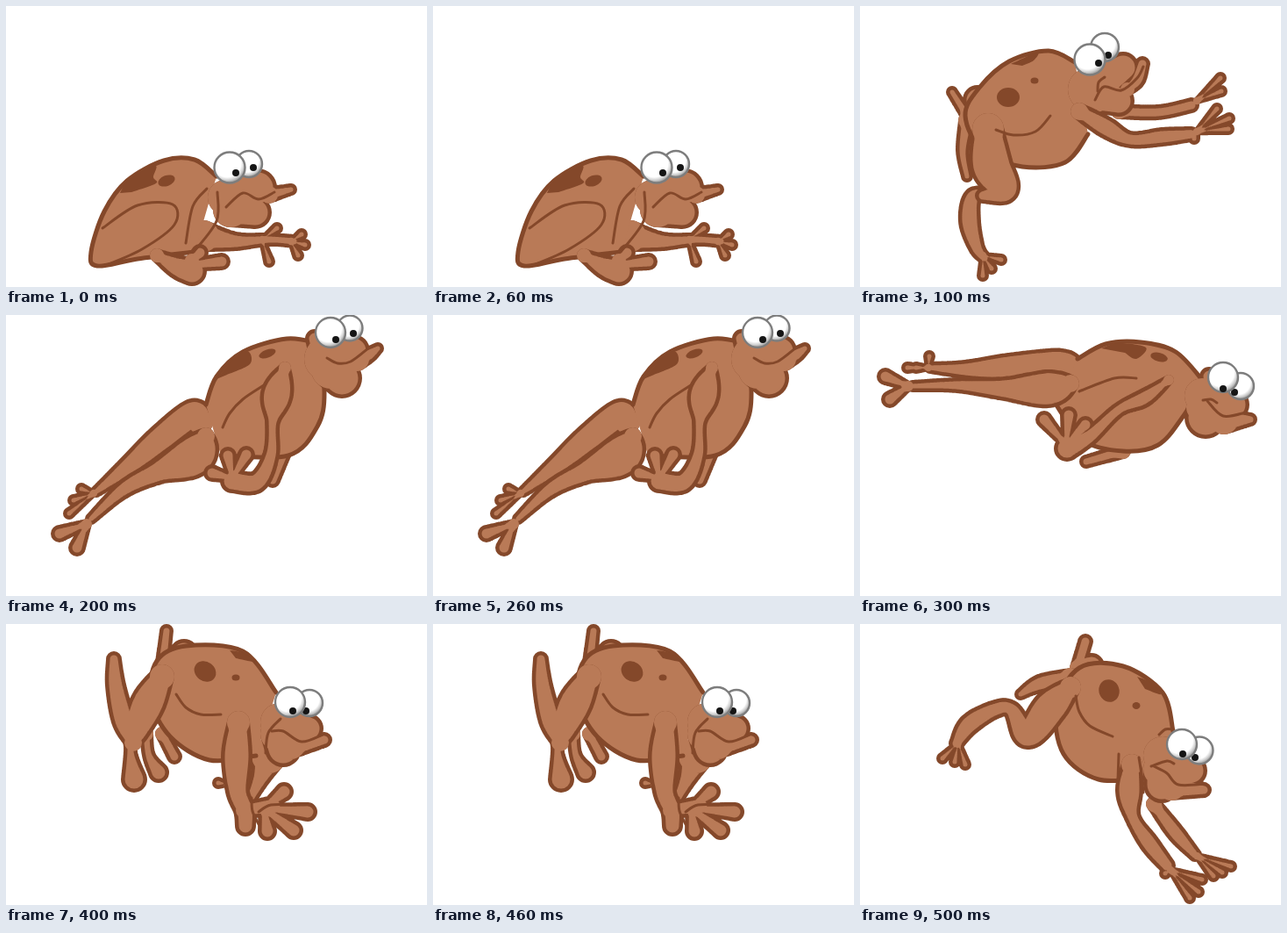
Recreate the animation shown at these times as an HTML page. Size 480x320 px, loop 0.6 s.

```html
<!DOCTYPE html>
<html lang="en">
<head>
<meta charset="utf-8">
<title>Leaping frog</title>
<style>
  html, body { margin: 0; width: 100%; height: 100%; overflow: hidden; background: #fff; }
  svg { display: block; width: 480px; height: 320px; }
  path { stroke-linecap: round; stroke-linejoin: round; }
</style>
</head>
<body>
<svg id="stage" viewBox="0 0 480 320">
  <defs>
    <radialGradient id="ball" cx=".42" cy=".36" r=".68">
      <stop offset=".66" stop-color="#fff"/>
      <stop offset=".8" stop-color="#d2d2d2"/>
      <stop offset="1" stop-color="#7c7c7c"/>
    </radialGradient>
  </defs>
</svg>
<script>
const SKIN = '#b97a57', DARK = '#84482a', STEP = 100, EDGE = 4.5;
const stage = document.getElementById('stage');
const poses = [];
let group;

function add(tag, attrs, parent = group) {
  const el = document.createElementNS('http://www.w3.org/2000/svg', tag);
  for (const key in attrs) el.setAttribute(key, attrs[key]);
  return parent.appendChild(el);
}

const points = text => text.trim().split(/\s+/).map(p => p.split(',').map(Number));

// Catmull-Rom spans as Bezier control points, for any number of dimensions.
const spans = pts => pts.slice(1).map((c, i) => {
  const b = pts[i], a = pts[i - 1] || b, e = pts[i + 2] || c;
  return [b, b.map((v, k) => v + (c[k] - a[k]) / 6), c.map((v, k) => v - (e[k] - b[k]) / 6), c];
});

// "|" makes the point before it a corner.
function curve(text) {
  let d = '', last = [];
  for (const part of text.split('|')) {
    const pts = [...last, ...points(part)];
    if (!d) d = 'M' + pts[0];
    for (const [, p, q, r] of spans(pts)) d += `C${p} ${q} ${r}`;
    last = [pts[pts.length - 1]];
  }
  return d;
}

const bezier = (s, t) => s[0].map((v, k) =>
  v * (1 - t) ** 3 + 3 * s[1][k] * t * (1 - t) ** 2 + 3 * s[2][k] * t * t * (1 - t) + s[3][k] * t ** 3);

// A spine of "x,y,radius" swept by a disc.
function sweep(spine) {
  return spans(points(spine)).flatMap((s, i) => {
    const n = Math.ceil(Math.hypot(s[3][0] - s[0][0], s[3][1] - s[0][1]) / 1.5) + 2;
    return Array.from({ length: n + 1 }, (_, j) => [...bezier(s, j / n), i + j / n]);
  });
}

const disc = (x, y, r) => `M${x - r} ${y}a${r} ${r} 0 1 0 ${2 * r} 0a${r} ${r} 0 1 0 ${-2 * r} 0`;

// Tubes share one outline, which swells from nothing where each tube starts.
function tubes(...spines) {
  const discs = spines.flat().flatMap(sweep);
  add('path', { d: discs.map(([x, y, r]) => disc(x, y, r)).join(''), fill: DARK });
  add('path', {
    d: discs.map(([x, y, r, t]) => disc(x, y, Math.max(0.5, r - EDGE * Math.min(1, 3 * t)))).join(''),
    fill: SKIN
  });
}

const digits = (root, tips, r = 7) => tips.split(' ').map(tip => `${root},${r * 0.6} ${tip},${r}`);

const body = pts => add('path', { d: curve(pts), fill: SKIN, stroke: DARK, 'stroke-width': 5 });
const line = pts => add('path', { d: curve(pts), fill: 'none', stroke: DARK, 'stroke-width': 3 });
const patch = pts => add('path', { d: curve(pts), fill: DARK });
const spot = (cx, cy, rx, ry, turn = 0) =>
  add('ellipse', { cx, cy, rx, ry, fill: DARK, transform: `rotate(${turn} ${cx} ${cy})` });

function eye(cx, cy, r, px, py) {
  add('circle', { cx, cy, r, fill: 'url(#ball)', stroke: '#7d7d7d', 'stroke-width': 2.4 });
  add('circle', { cx: px, cy: py, r: 4, fill: '#151515' });
}

function pose(draw) {
  group = add('g', { opacity: 0 }, stage);
  poses.push(group);
  draw();
}

// Crouch
pose(() => {
  tubes('225,262,18 262,268,11 300,266,8 328,268,8', digits('325,268', '337,260 341,272 333,284'),
    digits('292,266', '309,253 300,291'));
  body('240,194 215,175 180,176 138,199 112,234 97,280 104,296 150,288 215,280');
  tubes('172,284,8 195,297,14 212,302,17', '210,295,8 246,291,10', '212,290,8 221,281,10');
  tubes('250,218,20 287,207,22', '256,232,20 284,235,19', '300,215,10 325,209,7');
  line('110,253 150,227 190,226 192,249 155,277 112,296');
  line('205,270 213,228 229,208');
  line('241,212 240,245 214,280');
  line('251,229 270,213 288,220 306,212');
  patch('130,213 140,198 170,182 168,195 171,202 143,212');
  spot(183, 199, 10, 6, -20);
  eye(277, 180, 15, 282, 184);
  eye(255, 184, 17.5, 262, 190);
});

// Take-off
pose(() => {
  tubes('122,125,8 105,98,7', '122,130,10 117,165,8 122,194,7', '140,115,15 134,107,17');
  tubes('295,120,9 340,121,9 378,113,9', digits('384,108', '411,82 412,97'));
  body('245,64 215,51 170,63 136,93 120,125 140,165 185,183 234,178 260,146');
  tubes('150,216,8 129,217,11 125,245,13 133,275,10 142,287,8', digits('140,284', '140,307 150,299 161,289'));
  tubes('146,140,18 150,182,25 165,209,17 140,216,9');
  tubes('262,95,25 300,70,18', '265,98,24 295,108,18', '305,95,8 316,84,10 322,66,9');
  tubes('250,120,10 280,138,13 308,152,10 345,149,11 378,146,9',
    digits('384,143', '407,117 421,128 420,140 381,151'));
  line('268,107 278,92 298,96 316,82 323,69');
  line('271,97 272,87 279,81');
  line('155,141 175,147 200,143 217,125');
  patch('172,66 202,53 198,62 185,68');
  spot(169, 104, 13, 11);
  spot(199, 85, 4.5, 3.5);
  eye(279, 47, 16, 283, 56);
  eye(262, 61, 17.5, 272, 65);
});

// Stretch upward
pose(() => {
  tubes('222,122,14 213,113,18 175,142,17 140,172,13 103,201,7', digits('100,203', '86,198 77,211 72,226'));
  tubes('320,150,9 304,188,9');
  body('228,102 240,70 270,42 320,27 355,32 | 363,88 355,127 322,160 245,160');
  tubes('228,138,10 215,160,25 175,178,15 135,198,11 97,232,7', digits('92,238', '61,249 81,265', 10));
  tubes('318,60,7 309,90,19 304,122,9 302,160,10 286,190,13 258,189,14',
    digits('258,186', '235,180 253,160 274,159', 10));
  tubes('356,40,12 352,27,11', '365,50,25 396,41,19', '370,62,22 383,72,23', '400,50,14 414,45,10 424,38,7');
  line('247,128 255,112 270,96 294,80');
  line('366,49 378,55 393,53 413,38');
  patch('240,73 264,46 277,42 278,56 252,68');
  spot(298, 44, 10, 4.5, -20);
  eye(392, 15, 14.5, 396, 21);
  eye(370, 20, 17, 376, 28);
});

// Glide
pose(() => {
  tubes('240,66,14 230,60,22 170,60,17 120,62,11 80,60,7', digits('78,60', '79,47 64,60 54,60'));
  tubes('300,155,9 258,167,8');
  body('248,50 280,33 320,31 360,42 392,76 | 368,116 340,148 300,155 255,143 222,100');
  tubes('240,78,10 215,84,22 165,84,14 110,80,9 60,81,7', digits('55,81', '29,70 34,96', 10));
  tubes('352,74,6 325,94,11 295,108,9 262,138,11 236,152,15', digits('235,148', '210,119 238,114 257,125', 10));
  tubes('398,85,10 398,70,11', '390,92,20 425,102,19', '388,105,16 394,117,24', '415,120,16 445,119,8');
  line('250,87 290,72 315,72');
  line('391,97 400,96 407,100');
  line('396,98 414,115 440,111');
  patch('275,38 295,32 326,37 315,50 302,43');
  spot(341, 48, 10, 5, 15);
  eye(434, 81, 15, 427, 88);
  eye(414, 71, 17, 414, 84);
});

// Descent
pose(() => {
  tubes('178,50,9 183,8,8', '203,38,15 203,34,17');
  tubes('160,125,8 163,150,8 174,169,12', '178,125,8 192,151,9');
  tubes('252,182,4 242,181,7');
  tubes('300,150,20 290,175,12 278,200,8');
  body('308,78 270,31 205,25 172,42 165,85 187,128 232,155 285,150');
  tubes('178,60,14 162,90,21 148,122,16 142,143,8 146,177,15', '145,135,10 134,110,14 125,70,12 123,40,9');
  tubes('265,112,13 263,150,18 264,190,14 272,212,13 273,230,12', '272,212,10 305,207,12',
    digits('294,210', '298,236 328,235 344,214 317,191', 11));
  tubes('312,112,22 345,119,17', '310,125,20 316,142,21', '325,138,16 363,132,9');
  line('296,147 299,124 313,108');
  line('303,122 316,122 337,134 361,126');
  line('280,198 281,213 288,228');
  line('288,214 302,206 330,206');
  line('194,80 205,95 222,103 245,103');
  patch('255,30 270,33 284,43 262,39');
  spot(227, 54, 13, 11, 35);
  spot(262, 61, 4.5, 3.5);
  eye(346, 90, 15, 342, 99);
  eye(324, 89, 17, 327, 99);
});

// Reach for landing
pose(() => {
  tubes('248,50,9 257,20,9', '262,52,14 264,48,15');
  tubes('240,62,12 205,68,11 183,80,7');
  tubes('335,205,9 360,238,11 382,263,8', digits('384,264', '423,276 413,283 403,287'));
  body('357,122 345,78 300,48 250,50 224,95 232,148 272,177 325,175');
  tubes('240,72,12 217,95,21 191,126,17 173,98,11 155,97,11 125,114,13 110,136,9',
    digits('112,135', '94,153 108,157 120,160'));
  tubes('310,160,12 307,190,16 311,220,10 330,250,12 350,275,10',
    digits('354,280', '390,291 386,305 376,312 348,284'));
  tubes('345,150,22 378,167,18', '343,165,20 344,183,21', '355,185,16 392,189,9');
  line('332,162 350,156 358,159');
  line('335,162 350,170 363,183 394,182');
  line('341,126 348,120 356,120');
  line('323,192 321,172 318,152');
  line('294,178 295,148');
  line('246,82 250,100 262,116 288,128');
  patch('316,60 330,66 343,80 325,74');
  spot(284, 76, 11.5, 13, -20);
  spot(315, 93, 4.5, 4);
  eye(387, 144, 15.5, 382, 152);
  eye(367, 137, 17, 368, 148);
});

const share = 1 / poses.length, total = STEP * poses.length;
poses.forEach((el, i) => el.animate(
  [
    { opacity: 1, offset: 0 }, { opacity: 1, offset: share },
    { opacity: 0, offset: share }, { opacity: 0, offset: 1 }
  ],
  { duration: total, delay: i * STEP - total, iterations: Infinity }
));
</script>
</body>
</html>
```
